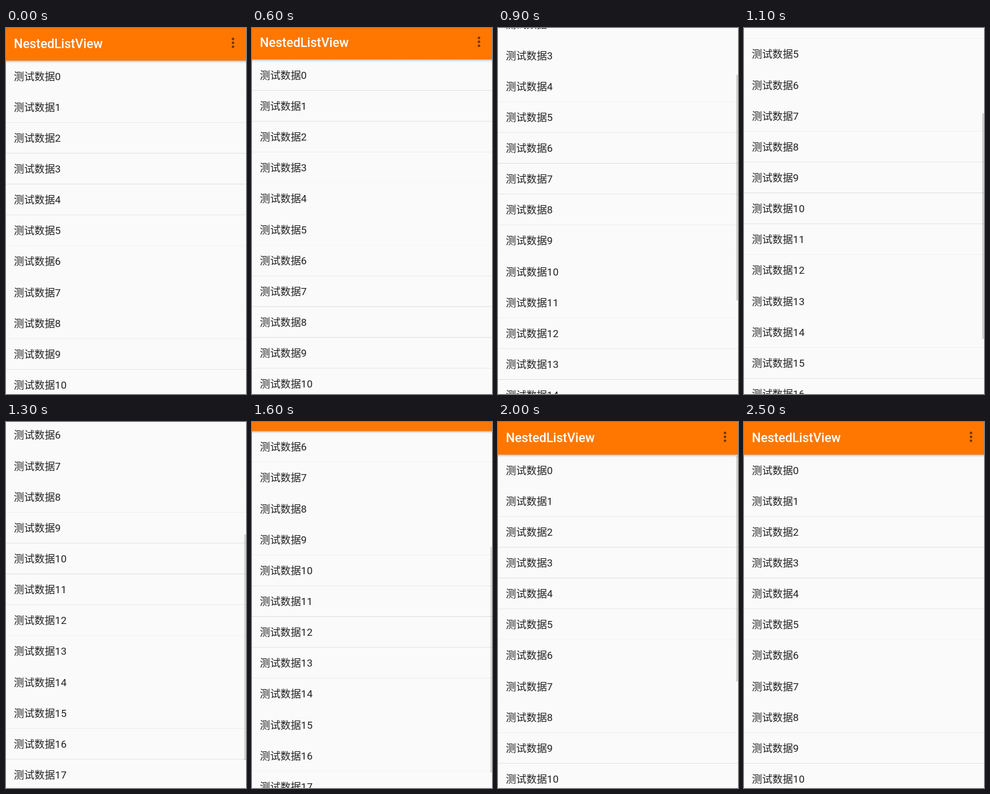
Animation, 406 px wide and 618 px high, one loop 3.6 s. Source, as an HTML page with a canvas:

```html
<!DOCTYPE html>
<html lang="zh-CN">
<head>
<meta charset="utf-8">
<title>NestedListView</title>
<style>
html, body { margin: 0; width: 100%; height: 100%; overflow: hidden; background: #fafafa; }
canvas { display: block; }
</style>
</head>
<body>
<canvas id="stage" width="406" height="618"></canvas>
<script>
const W = 406, H = 618, LOOP = 3600, STEP = 100;
const BAR = 55, ROW = 52.14, LEFT = 13.3;
const ctx = document.getElementById('stage').getContext('2d');

// [time, value] keys
const scroll = [[500, 0], [600, -1.7], [700, -58], [800, -126], [900, -191.5], [1100, -297.9],
  [1200, -355], [1300, -372], [1500, -372], [1600, -352.2], [1700, -270], [1800, -178.6], [1900, -78], [2000, 0]];
const header = [[500, 0], [600, -1.7], [700, -58], [800, -60], [1500, -60], [1600, -40], [1700, 0]];
const thumb = [[700, 0], [800, .17], [1500, .17], [1600, .12], [1700, .17], [2300, .17], [2400, .08], [2500, 0]];

function at(keys, t) {
  const i = keys.findIndex(k => k[0] > t);
  if (i === 0) return keys[0][1];
  if (i < 0) return keys[keys.length - 1][1];
  const [t0, a] = keys[i - 1], [t1, b] = keys[i];
  return a + (b - a) * (t - t0) / (t1 - t0);
}

function rect(color, x, y, w, h) {
  ctx.fillStyle = color;
  ctx.fillRect(x, y, w, h);
}

function text(str, font, color, y) {
  ctx.font = font + ' Roboto, "Noto Sans CJK SC", "Noto Sans CJK", sans-serif';
  ctx.fillStyle = color;
  ctx.fillText(str, LEFT, y);
}

function drawList(top) {
  for (let i = 0; i < 20; i++) {
    const y = top + i * ROW, line = y + ROW, pixel = Math.floor(line);
    text('测试数据' + i, '17.4px', '#212121', y + 32.6);
    // hairlines fade with their subpixel phase
    const strength = Math.max(0, 1 - Math.abs(line - pixel - .5) / .42);
    rect(`rgba(0,0,0,${.12 * strength})`, 0, pixel, W, 1);
  }
}

function drawHeader(y) {
  const bottom = Math.round(BAR + y);
  const shade = ctx.createLinearGradient(0, bottom, 0, bottom + 5);
  shade.addColorStop(0, 'rgba(0,0,0,.27)');
  shade.addColorStop(.4, 'rgba(0,0,0,.1)');
  shade.addColorStop(1, 'rgba(0,0,0,0)');
  rect(shade, 0, bottom, W, 5);
  rect('#ff7700', 0, 0, W, bottom);
  text('NestedListView', '500 21.4px', '#fff', y + 34);
  ctx.fillStyle = 'rgba(0,0,0,.54)';
  for (const d of [-6.6, 0, 6.6]) {
    ctx.beginPath();
    ctx.arc(384, y + 25 + d, 2.2, 0, 7);
    ctx.fill();
  }
}

function frame(now) {
  const t = Math.floor(now % LOOP / STEP) * STEP;
  const offset = at(scroll, t), head = at(header, t);
  rect('#fafafa', 0, 0, W, H);
  drawList(BAR + offset);
  const thumbY = Math.round(57 + head + (head - offset) * .62);
  rect(`rgba(0,0,0,${at(thumb, t)})`, 403, thumbY, 3, 381);
  drawHeader(head);
  requestAnimationFrame(frame);
}
requestAnimationFrame(frame);
</script>
</body>
</html>
```
